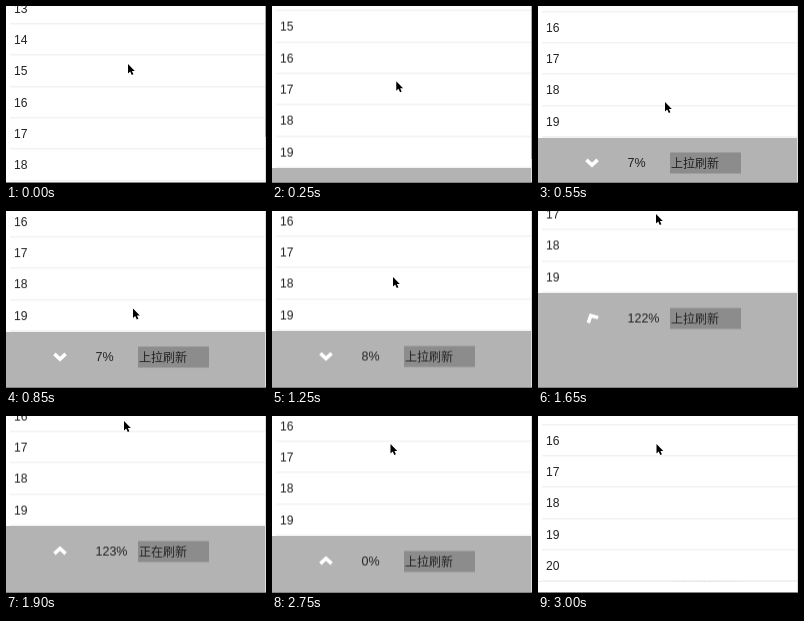
Write an HTML page that moves like this. It is 260 by 177 pixels and loops after 3.05 s.

```html
<!DOCTYPE html>
<html lang="zh">
<head>
<meta charset="utf-8">
<title>Pull up to refresh</title>
<style>
  html, body { margin: 0; width: 100%; height: 100%; overflow: hidden; background: #fff; }
  #stage {
    position: relative; width: 260px; height: 177px; overflow: hidden; background: #fff;
    font: 12.1px/31px "Liberation Sans", Arial, sans-serif; color: #222;
  }
  #stage div, #stage svg { position: absolute; }
  #list { left: 0; top: 0; width: 260px; will-change: transform; }
  .row { left: 0; width: 252px; height: 31.35px; padding-left: 8px; background: #fff; }
  .row::after {
    content: ""; position: absolute; left: 4px; right: 0; bottom: 0; height: 1px; background: #e6e6e6;
  }
  #footer { left: 0; top: 0; width: 260px; height: 200px; background: #b3b3b3; line-height: 21px; }
  #arrow { left: 44px; top: 15px; width: 20px; height: 20px; }
  #percent { left: 89.5px; top: 14.5px; font-size: 12.5px; }
  #label {
    left: 132px; top: 14.5px; width: 70px; height: 21px; padding-left: 1px; background: #8c8c8c;
    font: 12px/20px "Noto Sans CJK SC", "Noto Sans CJK", sans-serif; white-space: nowrap;
  }
  #edge { right: 0; top: 0; width: 1px; height: 177px; background: #dedede; }
  #bar { right: 0; top: 0; width: 1px; background: #aaa; }
  #base { left: 0; bottom: 0; width: 260px; height: 1px; background: #858585; }
  #cursor { left: 0; top: 0; width: 9px; height: 13px; overflow: visible; }
</style>
</head>
<body>
<div id="stage">
  <div id="list">
    <div id="footer">
      <svg id="arrow" viewBox="-10 -10 20 20">
        <path d="M-5.6-2.6 0 2.6 5.6-2.6" fill="none" stroke="#fff" stroke-width="3.5"/>
      </svg>
      <div id="percent"></div>
      <div id="label"></div>
    </div>
  </div>
  <div id="edge"></div>
  <div id="bar"></div>
  <div id="base"></div>
  <svg id="cursor" viewBox="0 0 9 13">
    <path d="M0 0V9.6L2.2 7.6 3.8 11 5.4 10.2 3.9 7H6.8Z" fill="#000" stroke="#fff" stroke-width="1" paint-order="stroke"/>
  </svg>
</div>
<script>
  const LOOP = 3050, STEP = 50, ROW = 31.35, REST = 120;
  const $ = id => document.getElementById(id);
  const list = $('list'), arrow = $('arrow'), percent = $('percent'),
        label = $('label'), bar = $('bar'), cursor = $('cursor');

  const added = [];
  for (let n = 10; n <= 22; n++) {
    const row = document.createElement('div');
    row.className = 'row';
    row.textContent = n;
    row.style.top = (n - 20) * ROW + 'px';
    list.append(row);
    if (n > 19) added.push(row);
  }

  const span = (t, a, b) => Math.min(1, Math.max(0, (t - a) / (b - a)));
  const smooth = u => u * u * (3 - 2 * u);
  const mix = (a, b, u) => a + (b - a) * u;
  const pull = t => 1 - (1 - span(t, 1250, 1650)) ** 1.5;

  // y of the footer's top edge: fling, drag, spring back, inset removal
  function footerY(t) {
    if (t < 1150) return REST + 86.5 * (1 - span(t, 0, 975)) ** 2.43;
    if (t < 1700) return mix(REST, 82, pull(t));
    if (t < 2750) return mix(81.7, REST, smooth(span(t, 1700, 2000)));
    return mix(REST, 134.5, span(t, 2750, 3000) ** 1.4);
  }

  function percentAt(t) {
    if (t < 1250) return 7;
    if (t < 1700) return Math.round(mix(8, 122, pull(t)));
    return t < 2750 ? 123 : 0;
  }

  // [time, x, y] of the pointer tip
  const path = [[0, 122, 58], [550, 127, 96], [950, 127, 98], [1150, 127, 98],
                [1250, 121, 66], [1650, 118, 3], [1850, 118, 3], [1900, 118, 5],
                [2000, 118.5, 28], [LOOP, 118.5, 28]];

  function pointer(t) {
    const i = path.findIndex(p => p[0] > t);
    const [a, x0, y0] = path[i - 1], [b, x1, y1] = path[i];
    const u = a === 1250 ? pull(t) : span(t, a, b);
    return [mix(x0, x1, u), mix(y0, y1, u)];
  }

  function draw(t) {
    const y = footerY(t), [px, py] = pointer(t);
    list.style.transform = `translateY(${y}px)`;
    cursor.style.transform = `translate(${px}px, ${py}px)`;
    arrow.style.transform = `rotate(${180 * smooth(span(t, 1500, 1700))}deg)`;
    percent.textContent = percentAt(t) + '%';
    label.textContent = t >= 1700 && t < 2750 ? '正在刷新' : '上拉刷新';
    bar.style.height = 131 + (206.5 - y) * 0.5 + 'px';
    bar.style.opacity = 1 - span(t, 300, 550);
    for (const row of added) row.style.visibility = t >= 2800 ? 'visible' : 'hidden';
  }

  const start = performance.now();
  function tick() {
    const t = (performance.now() - start) % LOOP;
    draw(Math.floor(t / STEP) * STEP);
    requestAnimationFrame(tick);
  }
  tick();
</script>
</body>
</html>
```
